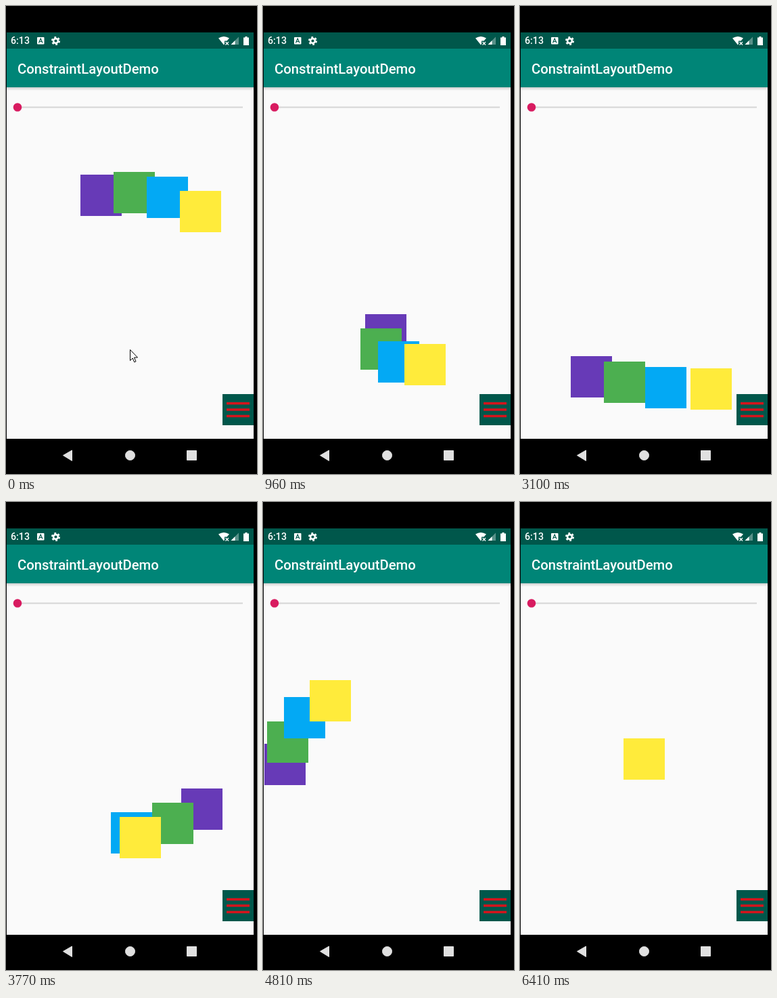
An HTML page that plays this animation: 371x691 px, repeating every 7150 ms.

```html
<!DOCTYPE html>
<html lang="en">
<head>
<meta charset="utf-8">
<title>ConstraintLayoutDemo</title>
<style>
  html, body { margin: 0; width: 100%; height: 100%; overflow: hidden; background: #000; }
  svg { display: block; font-family: Roboto, sans-serif; font-weight: 500; }
</style>
</head>
<body>
<svg width="371" height="691" viewBox="0 0 371 691">
  <defs>
    <linearGradient id="shade" x2="0" y2="1">
      <stop stop-color="#000" stop-opacity=".17"/>
      <stop offset="1" stop-color="#000" stop-opacity="0"/>
    </linearGradient>
  </defs>
  <rect width="371" height="691"/>
  <rect x="1" y="120" width="365" height="519" fill="#fafafa"/>
  <rect x="1" y="39" width="365" height="24" fill="#00574b"/>
  <rect x="1" y="63" width="365" height="57" fill="#008577"/>
  <rect x="1" y="120" width="365" height="5" fill="url(#shade)"/>

  <g fill="#fff">
    <text x="7" y="56" font-size="14.2">6:13</text>
    <text x="17" y="100" font-size="20.3">ConstraintLayoutDemo</text>
    <rect x="46" y="46" width="10.500" height="10.500" rx="1"/>
    <path d="M48.500 54.500L51.200 48L54 54.500M49.500 52.500H53" fill="none" stroke="#00574b" stroke-width="1.200"/>
    <circle cx="73.500" cy="51.500" r="5.200" fill="none" stroke="#fff" stroke-width="2.600" stroke-dasharray="2.700 2.745"/>
    <circle cx="73.500" cy="51.500" r="3.400" fill="none" stroke="#fff" stroke-width="2.600"/>
    <path d="M314 47.500Q322 42.500 330 47.500L326.500 51.500H323V56L322 57.500Z"/>
    <path d="M324.500 53L329 57.500M329 53L324.500 57.500" stroke="#fff" stroke-width="1.300"/>
    <path d="M344 45.500V57H332.500Z" opacity=".35"/>
    <path d="M338.500 51V57H332.500Z"/>
    <path d="M353.500 45H356.500V46.500H359V58H351V46.500H353.500Z"/>
  </g>

  <path d="M17 149.500H350" stroke="#d6d6d6" stroke-width="2"/>
  <circle cx="17" cy="149.500" r="6.300" fill="#d81b60"/>

  <g id="squares"></g>

  <rect x="320" y="573" width="46" height="46" fill="#00574b"/>
  <path d="M326 586.800H360M326 596H360M326 605.500H360" stroke="#d5141c" stroke-width="3.600"/>

  <g fill="#e0e0e0" stroke="#e0e0e0" stroke-linejoin="round">
    <path d="M84.500 663.500L97.500 656V671.500Z"/>
    <circle cx="183.500" cy="663.500" r="7"/>
    <rect x="267.500" y="656.500" width="14" height="14"/>
  </g>
  <path id="cursor" d="M.5 .5V16.500L4.200 13L6.700 18.800L9 17.800L6.500 12H11.500Z" fill="#fff" stroke="#000"/>
</svg>
<script>
const LOOP = 7150;
const REST = 2265;           // middle of the pause in the bottom row
const MIRROR = 4449;         // the way down replays the way up backwards
const START = 2467, DURATION = 4000;
const CENTER = { x: 153, y: 349 };
const ROW_Y = 209, RX = 151.5, RY = 104;

// Moments at which the screen refreshes.
const ticks = [0, 150, 300, 420, 540, 690, 810, 960, 1080, 1200, 1350, 1500, 1620, 1740,
  1880, 2000, 2530, 2680, 2830, 2950, 3100, 3220, 3340, 3500, 3620, 3770, 3920, 4040,
  4180, 4300, 4420, 4540, 4690, 4810, 4960, 5080, 5230, 5350, 5470, 5590, 5710, 5860,
  5980, 6140, 6290, 6410];

// keys: progress at the bottom, right, top and left of the orbit, then below the centre.
const squares = [
  { color: '#673ab7', rowX: -128,  keys: [.1553, .311, .455, .62, .77] },
  { color: '#4caf50', rowX: -42.7, keys: [.1944, .335, .497, .654, .81] },
  { color: '#03a9f4', rowX: 42.7,  keys: [.253, .379, .528, .692, .845] },
  { color: '#ffeb3b', rowX: 128,   keys: [.2715, .42, .56, .731, .884] },
];

// Tip of the pointer from a given time on; null hides it.
const pointer = [[0, 183, 507], [150, 196, 559], [300, null], [1620, 66, 673],
  [1740, 50, 610], [1880, 46, 597], [2680, 60, 673], [2830, null]];

const group = document.getElementById('squares');
const cursor = document.getElementById('cursor');
for (const square of squares) {
  square.node = document.createElementNS(group.namespaceURI, 'rect');
  square.node.setAttribute('width', 61);
  square.node.setAttribute('height', 61);
  square.node.setAttribute('fill', square.color);
  group.append(square.node);
}

function progressAt(t) {
  const clock = t < REST ? MIRROR - t : t;
  const u = Math.min(1, Math.max(0, (clock - START) / DURATION));
  return (1 - Math.cos(Math.PI * u)) / 2;
}

// Offset from the centre: straight line, three quarter turns, then a half turn inwards.
function offsetAt({ rowX, keys }, p) {
  const stops = [0, ...keys, 1];
  let leg = 0;
  while (leg < 5 && p >= stops[leg + 1]) leg++;
  const u = (p - stops[leg]) / (stops[leg + 1] - stops[leg]);
  if (leg === 0) return [rowX * (1 - u), ROW_Y + (RY - ROW_Y) * u];
  const eased = leg === 5 ? 1 - (1 - u) ** 1.1 : leg % 2 ? u ** 1.15 : u;
  const turn = Math.PI / 2;
  if (leg < 4) {
    const angle = turn * (leg - 1 + eased);
    return [RX * Math.sin(angle), RY * Math.cos(angle)];
  }
  const angle = turn * (leg - 4 + eased);
  return [-RX / 2 * (1 + Math.cos(angle)), 61.5 * Math.sin(angle)];
}

function draw(now) {
  const time = now % LOOP;
  const tick = ticks.findLast(t => t <= time);
  const p = progressAt(tick);
  for (const square of squares) {
    const [dx, dy] = offsetAt(square, p);
    square.node.setAttribute('x', Math.round(CENTER.x + dx));
    square.node.setAttribute('y', Math.round(CENTER.y + dy));
  }
  const [, x, y] = pointer.findLast(([t]) => t <= tick);
  cursor.style.display = x === null ? 'none' : '';
  if (x !== null) cursor.setAttribute('transform', `translate(${x} ${y})`);
}

const begin = performance.now();
function frame() {
  draw(performance.now() - begin);
  requestAnimationFrame(frame);
}
frame();
</script>
</body>
</html>
```
